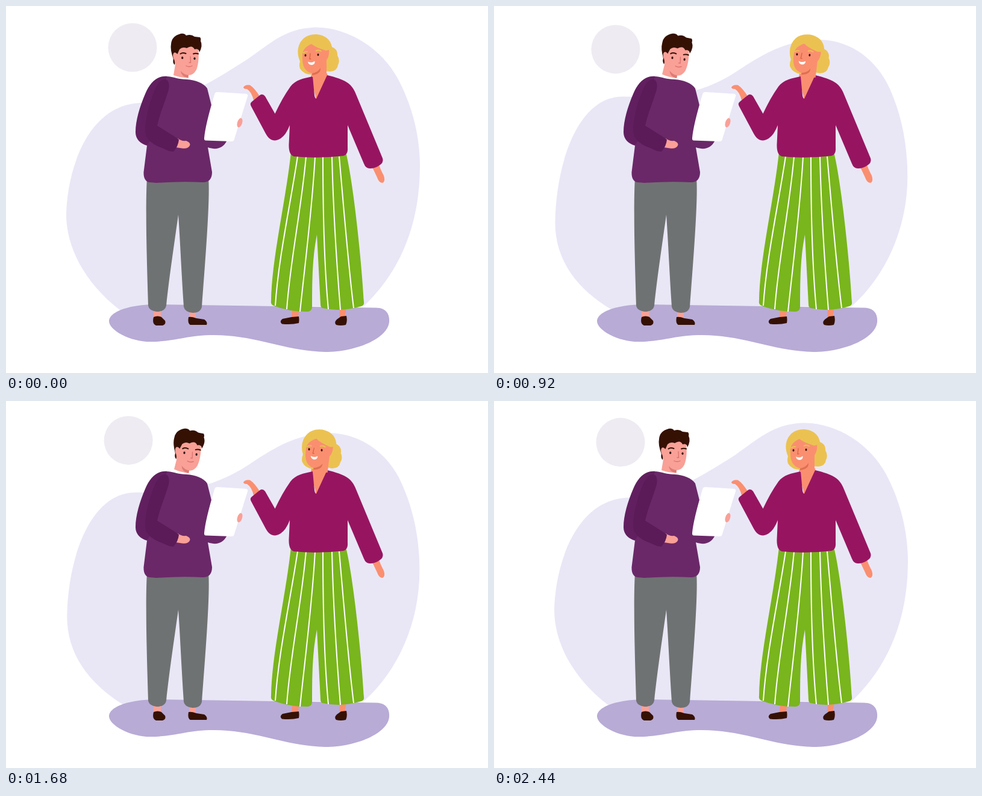
These frames come from a looping animation (800 by 610 pixels, 2480 ms). An HTML page:

```html
<!DOCTYPE html>
<html lang="en">
<head>
<meta charset="utf-8">
<title>Two people talking</title>
<style>
  html, body { margin: 0; width: 100%; height: 100%; overflow: hidden; background: #fff; }
  svg { display: block; width: 100vw; height: 100vh; }
  .ink { fill: #351104; }
  .line { fill: none; stroke-linecap: round; }
  .manSkin { fill: #f9a097; }
  .womanSkin { fill: #fa8f70; }
</style>
</head>
<body>
<svg viewBox="0 0 800 610">
  <circle id="sun" r="40.5" fill="#eeebf2"/>
  <path id="blob" fill="#e9e7f6"/>
  <path fill="#b8abd6" d="M171 523C172 508 205 496 250 496L612 501.500C631 501 637 512 636 525C634 552 582 575 530 575C460 573 415 547 345 547C300 547 280 558 240 558C205 558 170 538 171 523Z"/>

  <g id="man">
    <path class="manSkin" d="M245 504L257 504L257 519L245 519ZM304 506L315 506L315 519L304 519Z"/>
    <path class="ink" d="M245 517Q251 514 258 517L264 523Q266 529 260 531L249 531Q242 528 245 517ZM303 517Q308 516 316 519L329 521Q335 525 333 530L306 530Q301 528 303 517Z"/>
    <path fill="#6f7272" d="M234 285L336 285C339 320 331 420 325 500Q323 510 310 510Q297 509 295 500C291 440 289 390 286 347C280 390 271 450 266 498Q264 508 250 508Q237 506 236 498C234 430 231 340 234 285Z"/>
    <path fill="#6a2868" d="M268 117C280 118 286 122 300 122C314 123 328 128 334 137L341 165L350 190L366 225C360 236 350 240 335 235L342 276Q342 293 327 293Q290 291 250 294L238 293Q228 291 228.500 276L234 232L250 140Z"/>
    <path fill="#611f5f" d="M268 117C250 115 239 128 231.500 145C222 167 215 190 215 210C215 222 224 229 234 232L240 222L264 125Z"/>
    <path class="manSkin" d="M285 220Q291 225 299 224Q307 227 305 232Q302 238 292 236.500L282 235Z"/>
    <path fill="#5a1b58" d="M264 122C272 123 272 135 268 145C262 165 255 180 251 199C262 206 275 213 287 222Q286 233 278 242Q271 242 266 239C254 234 238 229 232 215C229 200 235 170 243 150C248 135 255 122 264 122Z"/>
    <path fill="#fff" d="M346 147Q347 143 351 143L399 146Q402 147 401 150L379 221Q378 225.500 374 225L331 223.500Q328.500 223 329 219Q331 197 346 147Z"/>
    <ellipse class="manSkin" rx="4" ry="8" transform="translate(388 194) rotate(18)"/>
  </g>

  <g id="manHead">
    <path class="manSkin" d="M277 78L288 66L318 66C321 80 320 96 316 106Q311 115 303 115L302.500 119.500Q289 119 278 115L281 97Q275 88 277 78Z"/>
    <path fill="#dd7c75" d="M290 108Q291 118 302.500 119.500L303 115Q295 114 290 108Z"/>
    <path class="ink" d="M280 98Q276 94 278 88Q272 73 274 63Q275 50 290 46Q296 45 299 49Q307 46 313 51L322 52Q324 54 323 58Q327 66 321 77Q320 70 313 72Q309 64 300 70Q293 67 288 72L284.500 80Q281 76 278.500 78Q276 81 278 87Q281 92 280 98Z"/>
    <path class="line" stroke="#351104" stroke-width="2" d="M289.500 79.500Q293 77 298.500 79M311 79.500Q315 78 319 79.500"/>
    <ellipse class="ink" cx="292.700" cy="86.200" rx="1.600" ry="2.100"/>
    <ellipse class="ink" cx="313" cy="87.300" rx="1.600" ry="2.100"/>
    <path class="line" stroke="#d9736c" stroke-width="1.300" d="M306 84L306.500 94L304 94M299 99.500Q304 102 309 99.500"/>
  </g>

  <g id="woman">
    <path class="womanSkin" d="M475 503L486 503L485 519L474 519ZM554 501L565 501L562 519L553 519Z"/>
    <path class="ink" d="M486 516Q487 522 486 527Q474 530 458 528.500Q453 524 459 520L474 517ZM565 515Q567 524 564 530Q555 532 548 530Q544 526 549 521L556 516Z"/>
    <path fill="#79b51c" d="M473 243L564 243C576 290 590 420 594 492Q595 497 590 499Q555 509 525 502Q522 501 522 496L516 380C508 420 508 460 508 501Q507 508 500 508Q468 508 444 498Q439 496 440 490C441 420 465 320 473 243Z"/>
    <path class="line" stroke="#fff" stroke-width="2" style="stroke-linecap:butt" d="M484 250C472 330 452 420 447 498M498 250C490 340 472 420 466 504M513 250C508 340 496 430 488 508M526 250C526 340 528 430 535 504M541 250C543 340 549 430 555 505M553 250C560 330 568 430 577 502"/>
    <path class="womanSkin" d="M394 135Q397 130 405 131.500Q413 137 421 150L411 157Q408 143 400 138Q394 138 394 135ZM608 268L619 264Q622 273 627 282Q630 291 625 294Q619 294 616 285Z"/>
    <path class="womanSkin" d="M507 112L533 112L534 118L515 156L506 118Z"/>
    <path fill="#971560" d="M509 117C494 120 480 123 472 134C462 148 454 163 446.500 179L430 150Q426 145 421 148.500L408 159Q404 162 407 167L431 212C438 225 447 226 456 220Q465 214 471 198L469.500 230Q469 248 478 250Q520 254 560 249Q568 247 567 236L567 198L594 262Q597 270 604 270Q613 270 621 264Q627 260 625 253L581 147C574 128 562 122 533 115L515 154Q513 154 512 149Z"/>
  </g>

  <g id="womanHead">
    <path fill="#ebc252" d="M508 114Q494 114 488 104Q486 98 488 92Q482 78 486 66Q493 47 515 47Q537 49 541 68Q551 72 550 82Q555 90 551 98Q550 108 538 109L528 108Z"/>
    <path class="womanSkin" d="M507 63C498 67 493 72 492 80C491 96 494 109 508 112L508 118L532 117L532 90Q537 83 536 73Q531 75 528 73Q514 69 507 63Z"/>
    <path fill="#de7052" d="M508 112Q518 110 522 103Q523 113 508 115Z"/>
    <path class="line" stroke="#ebc252" stroke-width="2" d="M493.500 78Q496 75.500 500 76M515 74.500Q519 72.500 523 75"/>
    <ellipse class="ink" cx="497" cy="82" rx="1.500" ry="2.100"/>
    <ellipse class="ink" cx="518" cy="81" rx="1.500" ry="2.100"/>
    <path class="line" stroke="#d9643f" stroke-width="1.300" d="M505 79L504 88L506 88"/>
    <path fill="#fff" d="M501 92.500Q507 95.500 512.500 91.500Q513 97.500 507 98Q502 97.500 501 92.500Z"/>
  </g>
</svg>
<script>
const LOOP = 2480, STEP = 40;
const $ = id => document.getElementById(id);

const blobStart = "M515 35.5C570 36 624 72 650 120C674 165 687 215 687 265C687 370 650 445 595 498L190 506C130 460 100 400 100 347C101 280 132 163 225 161C290 160 340 127 400 89C440 61 465 36 515 35.5Z";
const blobEnd = "M553 63C600 65 640 95 660 145C678 190 686 235 686 290C686 370 650 450 595 498L200 506C140 475 102 430 102 365C103 260 140 146 210 147C265 149 330 163 400 118C445 89 490 63 553 63Z";
const numbers = /[\d.]+/g;
const endValues = blobEnd.match(numbers);

function morph(k) {
  let i = 0;
  return blobStart.replace(numbers, v => (+v + (endValues[i++] - v) * k).toFixed(2));
}

function ease(t, from, to) {
  const k = Math.min(1, Math.max(0, (t - from) / (to - from)));
  return k * k * (3 - 2 * k);
}

// A head tilts over during [start, end] and returns near the end of the loop.
function tilt(id, t, start, end, angle, pivot) {
  const k = ease(t, start, end) - ease(t, 2060, 2420);
  $(id).setAttribute("transform", `rotate(${angle * k} ${pivot})`);
}

function draw(now) {
  const t = Math.floor(now % LOOP / STEP) * STEP;
  const phase = t / LOOP * 2 * Math.PI;
  $("sun").setAttribute("cx", 205.2 + 4.8 * Math.cos(phase));
  $("sun").setAttribute("cy", 69 + 4 * Math.sin(phase));
  $("blob").setAttribute("d", morph(1 - Math.abs(1 - 2 * t / LOOP)));
  tilt("manHead", t, 0, 480, 4.6, "296 127");
  tilt("womanHead", t, 560, 960, 6.8, "515 132");
  requestAnimationFrame(draw);
}
requestAnimationFrame(draw);
</script>
</body>
</html>
```
